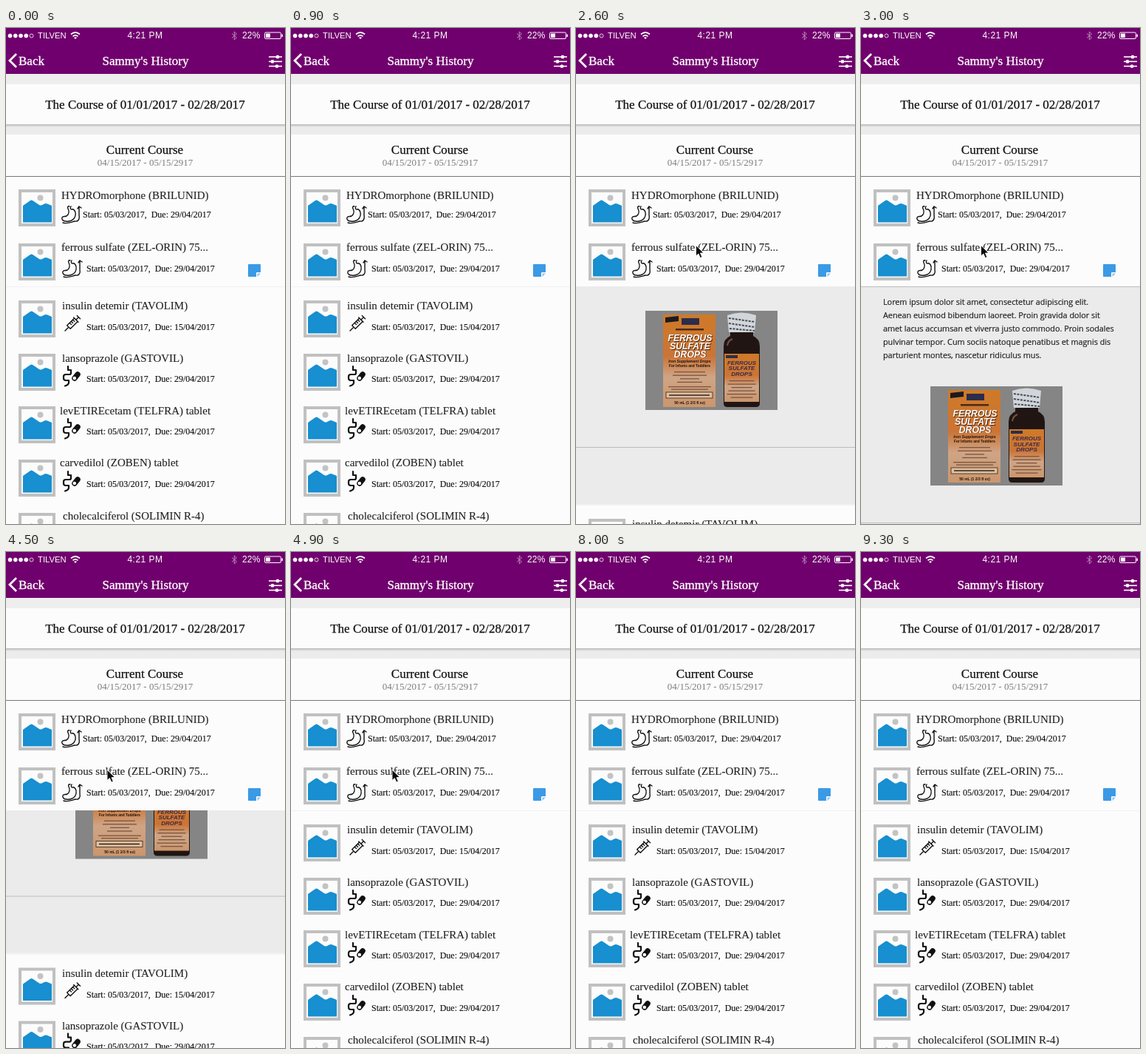
Animation of 378x670 px, one loop 9400 ms. Source, as an HTML page:

```html
<!DOCTYPE html>
<html lang="en">
<head>
<meta charset="utf-8">
<title>Medication history</title>
<style>
html, body { margin: 0; width: 100%; height: 100%; overflow: hidden; background: #fcfcfd; }
svg { display: block; width: 100%; height: 100%; }
text { font-family: "Liberation Serif", "Times New Roman", serif; fill: #1c1c1c; white-space: pre; }
.bar { font-family: "Liberation Sans", Arial, sans-serif; fill: #fff; }
.nav { font-size: 17px; fill: #fff; stroke: #fff; stroke-width: .35; }
.mid { text-anchor: middle; }
.head { font-size: 17px; fill: #111; stroke: #111; stroke-width: .25; }
.name { font-size: 15px; fill: #222; stroke: #222; stroke-width: .1; }
.dates { font-size: 12px; fill: #0c0c0c; stroke: #0c0c0c; stroke-width: .12; }
.lorem { font: 10.8px "Open Sans", "Noto Sans", sans-serif; fill: #222; stroke: #222; stroke-width: .2; }
.pack { font-family: "Liberation Sans", Arial, sans-serif; font-weight: bold; }
.line { fill: none; stroke: #111; stroke-linecap: round; stroke-linejoin: round; }
</style>
</head>
<body>
<svg viewBox="0 0 378 670" preserveAspectRatio="none">
  <defs>
    <clipPath id="below"><rect y="349" width="378" height="321"/></clipPath>
    <linearGradient id="shade" x2="0" y2="1">
      <stop offset="0" stop-color="#b9b9b9"/><stop offset="1" stop-color="#ececec"/>
    </linearGradient>
    <linearGradient id="orange" x2="0" y2="1">
      <stop offset="0" stop-color="#cf7a28"/><stop offset=".45" stop-color="#cb7435"/>
      <stop offset=".68" stop-color="#cfa586"/><stop offset="1" stop-color="#cb966c"/>
    </linearGradient>
    <g id="thumb">
      <rect x="2" y="2" width="46" height="46" fill="#fcfcfc" stroke="#c0c0c0" stroke-width="4"/>
      <circle cx="29.5" cy="11.5" r="4" fill="#c3c3c3"/>
      <path d="M6 44.500V22L16 15Q17.500 14 19 15L28 21Q30 22 32 21L35 19.500Q37 18.500 39 19.500L45 22V44.500Z" fill="#178fd0"/>
    </g>
    <g id="stomach" class="line" stroke-width="1.400">
      <path d="M11 2C9 1 8 3 9 5C11 9 10 13 7 15C5 16 2 15 1 17C0 20 3 22 6 22C12 23 18 20 19 14C20 9 17 5 14 6C12 6 12 4 13 2"/>
      <path d="M2 24C8 26 14 23 18 22C23 23 25 19 24 14V3M22 5L24 2L27 4"/>
    </g>
    <g id="syringe" class="line" stroke-width="1.400" transform="rotate(-45)">
      <path d="M0 0H7M7 -3.200H21V3.200H7ZM21 0H26M21 -4.500V4.500M26 -3V3M12 -3.200V0M15 -3.200V0M18 -3.200V0"/>
    </g>
    <g id="tablet" class="line">
      <path d="M8 1V6H12V10Q12 12 10 12H5Q2 12 2 15V17Q2 20 5 20H9V23Q9 26 4 27.500" stroke-width="2.200"/>
      <path d="M17 17L21 12" stroke-width="7.500"/>
      <circle cx="16.800" cy="17" r="2.300" fill="#fcfcfc" stroke="none"/>
    </g>
  </defs>

  <rect width="378" height="670" fill="#fcfcfd"/>
  <rect y="62" width="378" height="14" fill="#eee"/>
  <rect y="130" width="378" height="14" fill="#ececec"/>
  <rect y="130" width="378" height="4" fill="url(#shade)"/>
  <text class="head mid" x="188.500" y="109">The Course of 01/01/2017 - 02/28/2017</text>
  <text class="head mid" x="188" y="170">Current Course</text>
  <text class="mid" x="188.500" y="186" style="font-size:13px;fill:#7c7c7c">04/15/2017 - 05/15/2917</text>
  <rect y="200" width="378" height="1" fill="#777"/>
  <g id="fixed"></g>
  <path d="M329 319H344Q345 319 345 320V330H340Q339 330 339 331V336H329Q328 336 328 335V320Q328 319 329 319Z" fill="#3b9ae6"/>
  <path d="M340.500 336V331.500H345Z" fill="#8cc5f2"/>

  <g clip-path="url(#below)">
    <rect y="349" width="378" height="321" fill="#ebebeb"/>
    <g id="panel">
      <path d="M0 349.500H378M0 668.500H378" stroke="#bdbdbd"/>
      <g id="lorem"></g>
      <g id="photo">
        <rect x="94" y="484" width="179" height="134" fill="#858585"/>
        <rect x="118" y="489" width="71" height="125" fill="url(#orange)"/>
        <path d="M121 493L139 491V498L121 500Z" fill="#1b1a22"/>
        <rect x="143" y="494" width="24" height="9" fill="#2b2d4b"/>
        <rect x="135" y="508" width="38" height="2.500" fill="#4a2a18"/>
        <g id="label"></g>
        <rect x="122" y="594" width="63" height="8" fill="#dcc0a4" stroke="#3a2213" stroke-width=".8"/>
        <path d="M126 598H181" stroke="#3a2213" stroke-width="1.500"/>
        <path d="M205 490Q224 483 244 490L242 513H207Z" fill="#d2d6da"/>
        <path d="M207 494L242 499M207 501L242 506M208 508L242 511" stroke="#454d59" stroke-width="2" stroke-dasharray="3 1.500"/>
        <path d="M209 513H240V518Q249 522 249 532V609Q249 614 244 614H205Q200 614 200 609V532Q200 522 209 518Z" fill="#211513"/>
        <path d="M205 531Q206 524 212 522" fill="none" stroke="#78503f" stroke-width="2"/>
        <rect x="201" y="542" width="47" height="65" fill="url(#orange)"/>
        <rect x="203" y="544" width="16" height="4" fill="#2b2d4b"/>
        <g id="sticker"></g>
      </g>
    </g>
    <g id="list">
      <rect y="349" width="378" height="330" fill="#fcfcfd"/>
      <rect y="348" width="378" height="2" fill="#f1f1f2"/>
    </g>
  </g>

  <rect width="378" height="62" fill="#70006d"/>
  <g id="signal" fill="#fff" stroke="#fff"></g>
  <text class="bar" x="43" y="14" font-size="11.300">TILVEN</text>
  <g fill="none" stroke="#fff" stroke-width="1.700">
    <path d="M88 8.500Q94 3.500 100 8.500M90.500 11.300Q94 8.300 97.500 11.300"/>
    <path d="M92 13L94 15L96 13Q94 11.500 92 13Z" fill="#fff" stroke="none"/>
  </g>
  <text class="bar mid" x="188.500" y="14" font-size="12" letter-spacing=".5">4:21 PM</text>
  <path d="M306 7.500L312.500 13L309.300 16V5L312.500 8L306 13.500" fill="none" stroke="#b98bb8"/>
  <text class="bar" x="320" y="14" font-size="12" letter-spacing=".2">22%</text>
  <rect x="350.500" y="6" width="22" height="8.500" rx="1.500" fill="none" stroke="#fff"/>
  <rect x="352" y="7.500" width="6" height="5.500" fill="#fff"/>
  <rect x="373.500" y="8.500" width="1.500" height="3.500" fill="#fff"/>
  <path d="M14 35L5 44L14 53" fill="none" stroke="#fff" stroke-width="2.800"/>
  <text class="nav" x="17" y="50">Back</text>
  <text class="nav mid" x="189" y="50">Sammy's History</text>
  <g id="sliders" fill="#fff"></g>

  <path id="cursor" d="M0 0V14.500L3.400 11.500L5.800 17L8.300 16L6 10.500H10.500Z" fill="#0a0a0a" stroke="#fff" stroke-width=".9"/>
</svg>
<script>
const LOOP = 9400, DROP = 397;
const $ = id => document.getElementById(id);

function add(parent, tag, attrs, text) {
  const el = document.createElementNS('http://www.w3.org/2000/svg', tag);
  for (const key in attrs) el.setAttribute(key, attrs[key]);
  if (text) el.textContent = text;
  parent.append(el);
}

// name, name x, name baseline, thumb top, icon, icon x, icon y, dates x, dates baseline, due date
const rows = [
  ['HYDROmorphone (BRILUNID)', 75, 231, 218, 'stomach', 75, 239, 104, 256, '29/04'],
  ['ferrous sulfate (ZEL-ORIN) 75...', 75, 301, 291, 'stomach', 76, 312, 109, 329, '29/04'],
  ['insulin detemir (TAVOLIM)', 76, 380, 368, 'syringe', 80, 409, 109, 408, '15/04'],
  ['lansoprazole (GASTOVIL)', 76, 451, 440, 'tablet', 76, 456, 109, 478, '29/04'],
  ['levETIREcetam (TELFRA) tablet', 73, 522, 511, 'tablet', 76, 527, 109, 549, '29/04'],
  ['carvedilol (ZOBEN) tablet', 73, 592, 583, 'tablet', 76, 598, 109, 620, '29/04'],
  ['cholecalciferol (SOLIMIN R-4)', 77, 664, 655, 'tablet', 76, 670, 109, 692, '29/04']
];
rows.forEach(([name, x, y, top, icon, ix, iy, dx, dy, due], i) => {
  const g = i < 2 ? $('fixed') : $('list');
  add(g, 'use', { href: '#thumb', x: 17, y: top });
  add(g, 'use', { href: '#' + icon, x: ix, y: iy });
  add(g, 'text', { class: 'name', x, y }, name);
  add(g, 'text', { class: 'dates', x: dx, y: dy }, `Start: 05/03/2017,  Due: ${due}/2017`);
});

['Lorem ipsum dolor sit amet, consectetur adipiscing elit.',
 'Aenean euismod bibendum laoreet. Proin gravida dolor sit',
 'amet lacus accumsan et viverra justo commodo. Proin sodales',
 'pulvinar tempor. Cum sociis natoque penatibus et magnis dis',
 'parturient montes, nascetur ridiculus mus.'
].forEach((s, i) => add($('lorem'), 'text', { class: 'lorem', x: 30, y: 374 + 18 * i }, s));

const pack = (g, x, y, size, fill, s, style = 'italic') =>
  add(g, 'text', { class: 'pack mid', x, y, style: `font-size:${size}px;fill:${fill};font-style:${style}` }, s);
['FERROUS', 'SULFATE', 'DROPS'].forEach((s, i) => {
  pack($('label'), 155.3, 525.8 + 10.8 * i, 12.3, '#40200f', s);
  pack($('label'), 154.5, 525 + 10.8 * i, 12.3, '#fff', s);
  pack($('sticker'), 224.5, 557 + 7.5 * i, 8, '#3b2a4a', s);
});
pack($('label'), 154, 554, 5.2, '#24120a', 'Iron Supplement Drops');
pack($('label'), 154, 560, 4.8, '#24120a', 'For Infants and Toddlers', 'normal');
pack($('label'), 154, 610.5, 5, '#24120a', '50 mL (1 2/3 fl oz)', 'normal');
const bar = (g, cx, y, w) => add(g, 'rect', { x: cx - w / 2, y, width: w, height: 1.3, fill: '#7a5540' });
[42, 46, 26, 34].forEach((w, i) => bar($('label'), 154, 566 + 4.6 * i, w));
[58, 50].forEach((w, i) => bar($('label'), 154, 586 + 3.5 * i, w));
[34, 38, 28, 36, 40, 30].forEach((w, i) => bar($('sticker'), 224.5, 578 + 4.5 * i, w));

for (let i = 0; i < 5; i++)
  add($('signal'), 'circle', { cx: 5.5 + 7.25 * i, cy: 10.5, r: 2.5, 'stroke-width': .8, 'fill-opacity': +(i < 4) });
[368, 361, 367].forEach((x, i) => {
  const y = 39 + 6.3 * i;
  add($('sliders'), 'rect', { x: 356, y: y - .8, width: 18, height: 1.6 });
  add($('sliders'), 'rect', { x: x - 2.2, y: y - 2.2, width: 4.4, height: 4.4, rx: 1.5 });
});

// time, x, y
const path = [
  [1200, 400, 470], [1900, 162.5, 293.5], [3050, 162.5, 293.5],
  [3400, 226, 226], [3800, 137, 294], [5150, 137, 294], [5800, 400, 430]
];
const ease = (t, a, b) => {
  const p = Math.min(1, Math.max(0, (t - a) / (b - a)));
  return p * p * (3 - 2 * p);
};
const move = (id, x, y) => $(id).setAttribute('transform', `translate(${x} ${y})`);

function draw(t) {
  const open = DROP * (ease(t, 2200, 2800) - ease(t, 4196, 4796));
  move('list', 0, open);
  move('panel', 0, open - DROP);
  let [, x, y] = path[0];
  for (let i = 1; i < path.length; i++) {
    const [a, x0, y0] = path[i - 1], [b, x1, y1] = path[i], p = ease(t, a, b);
    x += (x1 - x0) * p;
    y += (y1 - y0) * p;
  }
  move('cursor', x, y);
}

const start = performance.now();
function tick() {
  draw((performance.now() - start) % LOOP);
  requestAnimationFrame(tick);
}
tick();
</script>
</body>
</html>
```
